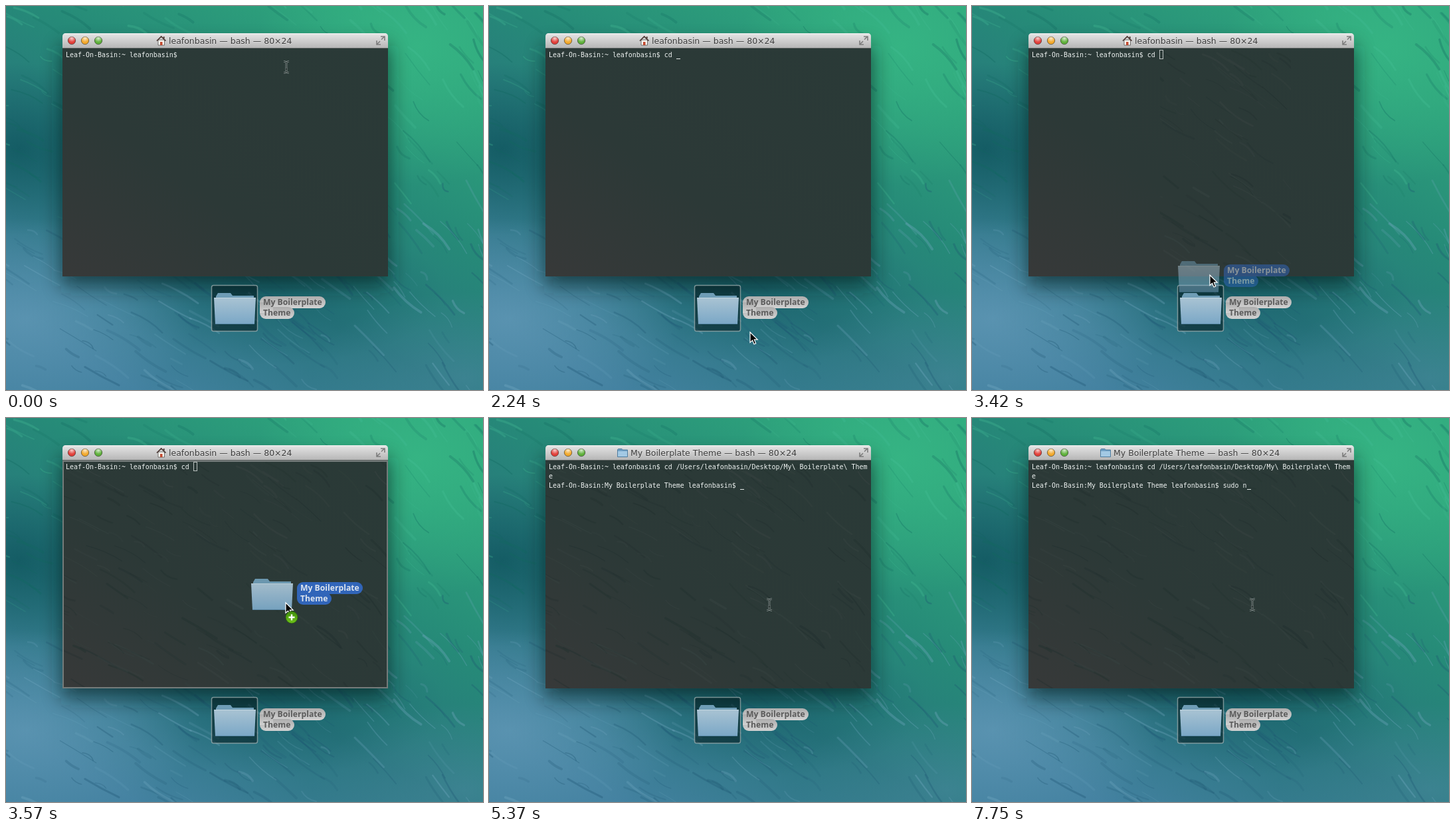
An HTML page that plays this animation: 718 px wide and 578 px high, repeating every 8000 ms.

```html
<!DOCTYPE html>
<html lang="en">
<head>
<meta charset="utf-8">
<title>Terminal drag and drop</title>
<style>
html, body { margin: 0; width: 100%; height: 100%; overflow: hidden; background: #2b7f80; }
svg { position: absolute; inset: 0; width: 100%; height: 100%; display: block; }
text { white-space: pre; }
.mono { font: 9.966px "DejaVu Sans Mono", monospace; fill: #eef2f1; }
.title { font: 12.5px "DejaVu Sans", sans-serif; fill: #3c3c3c; }
.label { font: bold 12.2px "Noto Sans", sans-serif; }
</style>
</head>
<body>
<svg viewBox="0 0 718 578">
  <defs>
    <linearGradient id="sea" gradientUnits="userSpaceOnUse" x1="520" y1="0" x2="200" y2="578">
      <stop offset="0" stop-color="#2fa67c"/><stop offset=".35" stop-color="#268a78"/>
      <stop offset=".65" stop-color="#28757d"/><stop offset="1" stop-color="#4381a0"/>
    </linearGradient>
    <radialGradient id="deep"><stop offset="0" stop-color="#115860" stop-opacity=".85"/><stop offset="1" stop-color="#115860" stop-opacity="0"/></radialGradient>
    <radialGradient id="glow"><stop offset="0" stop-color="#36b584" stop-opacity=".9"/><stop offset="1" stop-color="#36b584" stop-opacity="0"/></radialGradient>
    <radialGradient id="pale"><stop offset="0" stop-color="#5f97b4" stop-opacity=".8"/><stop offset="1" stop-color="#5f97b4" stop-opacity="0"/></radialGradient>
    <linearGradient id="bar" x2="0" y2="1"><stop offset="0" stop-color="#e6e6e6"/><stop offset="1" stop-color="#b4b4b4"/></linearGradient>
    <linearGradient id="pane" x1="1" y1="0" x2="0" y2="1">
      <stop offset="0" stop-color="#2a3a37"/><stop offset=".6" stop-color="#2c3937"/><stop offset="1" stop-color="#373939"/>
    </linearGradient>
    <linearGradient id="front" x2="0" y2="1"><stop offset="0" stop-color="#a9c3d3"/><stop offset="1" stop-color="#7aa7c6"/></linearGradient>
    <linearGradient id="gray" x2="0" y2="1"><stop offset="0" stop-color="#adadad"/><stop offset="1" stop-color="#d2d2d2"/></linearGradient>
    <linearGradient id="plus" x2="0" y2="1"><stop offset="0" stop-color="#3f8d0c"/><stop offset="1" stop-color="#6fc31a"/></linearGradient>
    <radialGradient id="shine" cy=".2" r=".75"><stop offset="0" stop-color="#fff" stop-opacity=".75"/><stop offset=".7" stop-color="#fff" stop-opacity="0"/></radialGradient>
    <filter id="blur" x="-20%" y="-20%" width="140%" height="140%"><feGaussianBlur stdDeviation="15"/></filter>
    <clipPath id="hole"><rect id="holeBox" x="85" y="64" width="490" height="343"/></clipPath>

    <g id="folder">
      <path d="M316 441V437L319 432H338L341 436H373V441Z" fill="#6f9db6"/>
      <path d="M313 439H376L374 479H315Z" fill="url(#front)"/>
      <path d="M313 439.5H376" stroke="#c2d6e0"/>
      <path d="M315 478.5H374" stroke="#5d8cab"/>
    </g>
    <g id="pill">
      <rect x="382" y="437" width="99" height="18" rx="9"/>
      <rect x="382" y="453" width="52" height="18" rx="9"/>
      <rect x="382" y="446" width="20" height="16"/>
    </g>
    <g id="caption" class="label">
      <text x="387" y="450">My Boilerplate</text>
      <text x="387" y="466">Theme</text>
    </g>
  </defs>

  <g>
    <rect width="718" height="578" fill="url(#sea)"/>
    <ellipse cx="620" cy="60" rx="240" ry="210" fill="url(#glow)"/>
    <ellipse cx="20" cy="215" rx="170" ry="130" fill="url(#deep)"/>
    <ellipse cx="400" cy="430" rx="260" ry="110" fill="url(#deep)" opacity=".6"/>
    <ellipse cx="30" cy="470" rx="260" ry="150" fill="url(#pale)"/>
    <ellipse cx="690" cy="560" rx="230" ry="130" fill="url(#pale)" opacity=".45"/>
    <g id="waves" fill="none" stroke-linecap="round"></g>
  </g>

  <rect x="83" y="60" width="494" height="362" rx="6" fill="#021a1c" opacity=".62" filter="url(#blur)"/>
  <rect x="85" y="63" width="490" height="344" fill="url(#pane)"/>
  <g clip-path="url(#hole)"><g id="ripples" fill="none" stroke-linecap="round"></g></g>
  <path d="M85 64V46Q85 41 90 41H570Q575 41 575 46V64Z" fill="url(#bar)"/>
  <path d="M88 41.7H572" stroke="#f4f4f4" stroke-opacity=".8"/>
  <path d="M85 63.5H575" stroke="#5c6160"/>
  <g id="lights"></g>
  <g fill="none" stroke="#7c7c7c" stroke-width="1.6">
    <path d="M565 50.5L569.5 46M564 46H570V52M563 53L558.5 57.5M558 52V58H564"/>
  </g>
  <g id="home">
    <path d="M229 51H238.500V59H229Z" fill="#f7f4ee" stroke="#555" stroke-width=".8"/>
    <path d="M227 52.500L233.700 46L240.500 52.500M237.700 49V46" fill="none" stroke="#4a3430" stroke-width="1.7"/>
    <path d="M232 54H235.500V59H232Z" fill="#c2492f"/>
  </g>
  <g id="dir">
    <path d="M193.500 58.500V47.500L194.500 46.500H200L201.500 48H208.500V58.500Z" fill="#6f9fc4" stroke="#4f7c9e"/>
    <path d="M194 50H208V58H194Z" fill="#a3c9e4"/>
  </g>
  <g class="title">
    <text id="titleGlow" y="58" style="fill:#fff;fill-opacity:.5"></text>
    <text id="title" y="57"></text>
  </g>

  <g class="mono">
    <text x="90" y="77"></text><text x="90" y="91"></text><text x="90" y="105"></text>
  </g>
  <rect id="under" width="6" height="1" fill="#e4e9e8"/>
  <rect id="hollow" width="5" height="13" fill="none" stroke="#b9c0be"/>
  <rect id="ring" x="86" y="65" width="488" height="341" fill="none" stroke="#747b7a" stroke-width="2"/>

  <rect x="309.500" y="420.500" width="69" height="69" rx="3" fill="#02191c" fill-opacity=".55" stroke="#a5b4b4" stroke-opacity=".7" stroke-width="1.500"/>
  <use href="#folder"/>
  <use href="#pill" fill="url(#gray)"/>
  <use href="#caption" fill="#5b5b5b"/>

  <g id="ghost">
    <use href="#folder"/>
    <use href="#pill" fill="#3268c0"/>
    <use href="#caption" fill="#e6edf8"/>
  </g>

  <g id="beam" fill="none">
    <path id="beamShape" d="M-4 -8.500Q-.5 -8.500 0 -6.500Q.5 -8.500 4 -8.500M0 -6.500V6.500M-4 8.500Q-.5 8.500 0 6.500Q.5 8.500 4 8.500M-2 3H2" stroke="#b8c4c2" stroke-opacity=".75" stroke-width="2.600"/>
    <path d="M-4 -8.500Q-.5 -8.500 0 -6.500Q.5 -8.500 4 -8.500M0 -6.500V6.500M-4 8.500Q-.5 8.500 0 6.500Q.5 8.500 4 8.500M-2 3H2" stroke="#0c1414"/>
  </g>
  <g id="arrow">
    <path d="M0 0V15.500L3.600 12.200L6 18L8.700 16.900L6.300 11.200H11.200Z" stroke="#fff" stroke-width="1.200"/>
    <g id="badge">
      <circle cx="9" cy="22" r="9" fill="url(#plus)" stroke="#2f6a0a" stroke-width=".8"/>
      <path d="M9 17.500V26.500M4.500 22H13.500" stroke="#fff" stroke-width="2.400"/>
    </g>
  </g>
</svg>
<script>
const $ = id => document.getElementById(id);
const LOOP = 8000, CELL = 6, ROW = 14, LEFT = 90, COLS = 80;

// Seeded generator for the water streaks
function random(seed) {
  return () => (seed = (seed * 16807) % 2147483647) / 2147483647;
}

function streaks(count, seed, box, paint) {
  const rnd = random(seed), [x0, y0, w, h] = box;
  let out = '';
  for (let i = 0; i < count; i++) {
    const x = x0 + rnd() * w, y = y0 + rnd() * h, len = 14 + rnd() * 50;
    const angle = (28 + 30 * (x / 718) ** 2 + (rnd() - .5) * 14) * Math.PI / 180;
    const dx = len * Math.cos(angle), dy = len * Math.sin(angle), bend = (rnd() - .5) * 10;
    const { color, alpha, width } = paint(x, y, rnd);
    out += `<path d="M${x.toFixed(1)} ${y.toFixed(1)}q${(dx / 2 + bend).toFixed(1)} ${(dy / 2 - bend).toFixed(1)} ${dx.toFixed(1)} ${dy.toFixed(1)}" stroke="${color}" stroke-opacity="${alpha.toFixed(2)}" stroke-width="${width.toFixed(1)}"/>`;
  }
  return out;
}

$('waves').innerHTML = streaks(420, 71, [-50, -40, 770, 620], (x, y, rnd) => {
  const low = y > 330 - x * .1;
  const light = rnd() < .45;
  return {
    color: light ? (low ? '#74a9c2' : '#45bd96') : (low ? '#1d5470' : '#12685f'),
    alpha: .12 + rnd() * .22,
    width: 1 + rnd() * 3
  };
});
$('ripples').innerHTML = streaks(170, 29, [60, 60, 500, 340], (x, y, rnd) => ({
  color: rnd() < .6 ? '#22302f' : '#374341',
  alpha: .2 + rnd() * .35,
  width: 1 + rnd() * 2.5
}));
$('lights').innerHTML = ['#e2403a', '#f2a92c', '#5fb13b'].map((color, i) => {
  const at = `cx="${99 + 20 * i}" cy="52" r="5.7"`;
  return `<circle ${at} fill="${color}" stroke="#000" stroke-opacity=".45"/><circle ${at} fill="url(#shine)"/>`;
}).join('');

const HOST = 'Leaf-On-Basin', USER = 'leafonbasin';
const CD = `cd /Users/${USER}/Desktop/My\\ Boilerplate\\ Theme `;
const PROMPT = `\n${HOST}:My Boilerplate Theme ${USER}$ `;
const OFF = 0, UNDER = 1, HOLLOW = 2;

// [time, text after the first prompt, caret style]
const typing = [
  [0, '', OFF], [600, '', UNDER], [750, 'c', UNDER], [1200, 'cd', UNDER],
  [1500, 'cd ', UNDER], [2980, 'cd ', OFF], [3280, 'cd ', HOLLOW], [4020, CD, UNDER],
  [5070, CD + '\n', UNDER], [5220, CD + PROMPT, OFF], [5370, CD + PROMPT, UNDER],
  [6120, CD + PROMPT, OFF], [6570, CD + PROMPT, UNDER],
  ...[[6720, 's'], [6870, 'su'], [7010, 'sud'], [7310, 'sudo'], [7460, 'sudo '], [7750, 'sudo n']]
    .map(([time, cmd]) => [time, CD + PROMPT + cmd, UNDER])
];

// [time, pointer, x, y]
const pointer = [
  [0, 'beam', 422, 92], [1950, 'beam', 417, 130], [2090, 'beam', 400, 285],
  [2240, 'arrow', 393, 491], [2390, 'arrow', 374, 472], [2530, 'arrow', 362, 453],
  [3280, 'arrow', 358, 405], [3430, 'arrow', 396, 335], [3570, 'arrow', 421, 278],
  [4020, 'beam', 422, 281]
];

// [time, dx, dy, opacity]
const drag = [[0, 0, 0, 0], [3280, -3, -48, .5], [3430, 33, -130, .75], [3570, 56, -190, .95], [4020, 0, 0, 0]];

const pick = (steps, t) => steps.findLast(step => step[0] <= t);
const show = (id, on) => $(id).setAttribute('visibility', on ? 'visible' : 'hidden');
const move = (id, x, y) => $(id).setAttribute('transform', `translate(${x} ${y})`);
const rows = document.querySelectorAll('.mono text');

function put(node, text) {
  if (node.textContent !== text) node.textContent = text;
}

function drawText(t) {
  const [, typed, caret] = pick(typing, t);
  const lines = `${HOST}:~ ${USER}$ ${typed}`.split('\n')
    .flatMap(line => line.match(new RegExp(`.{1,${COLS}}`, 'g')) || ['']);
  rows.forEach((row, i) => put(row, lines[i] || ''));
  const last = lines.length - 1, x = LEFT + CELL * lines[last].length, y = ROW * last;
  move('under', x, 79 + y);
  move('hollow', x + .5, 66.5 + y);
  show('under', caret === UNDER);
  show('hollow', caret === HOLLOW);
}

function drawTitle(t) {
  const moved = t >= 5220;
  for (const id of ['title', 'titleGlow']) {
    put($(id), `${moved ? 'My Boilerplate Theme' : USER} — bash — 80×24`);
    $(id).setAttribute('x', moved ? 213 : 245);
  }
  show('home', !moved);
  show('dir', moved);
}

function drawPointer(t) {
  const [, kind, x, y] = pick(pointer, t), over = t >= 3430 && t < 4020;
  move(kind, x, y);
  show('beam', kind === 'beam');
  show('arrow', kind === 'arrow');
  show('badge', over);
  show('ring', over);
  const [, dx, dy, alpha] = pick(drag, t);
  move('ghost', dx, dy);
  $('ghost').setAttribute('opacity', alpha);
}

function drawRipples(t) {
  const full = t >= 3430;
  show('ripples', t >= 3280);
  $('holeBox').setAttribute('x', full ? 85 : 283);
  $('holeBox').setAttribute('width', full ? 490 : 197);
}

function draw(t) {
  drawText(t);
  drawTitle(t);
  drawPointer(t);
  drawRipples(t);
}

const start = performance.now();
function tick() {
  draw((performance.now() - start) % LOOP);
  requestAnimationFrame(tick);
}
tick();
</script>
</body>
</html>
```
